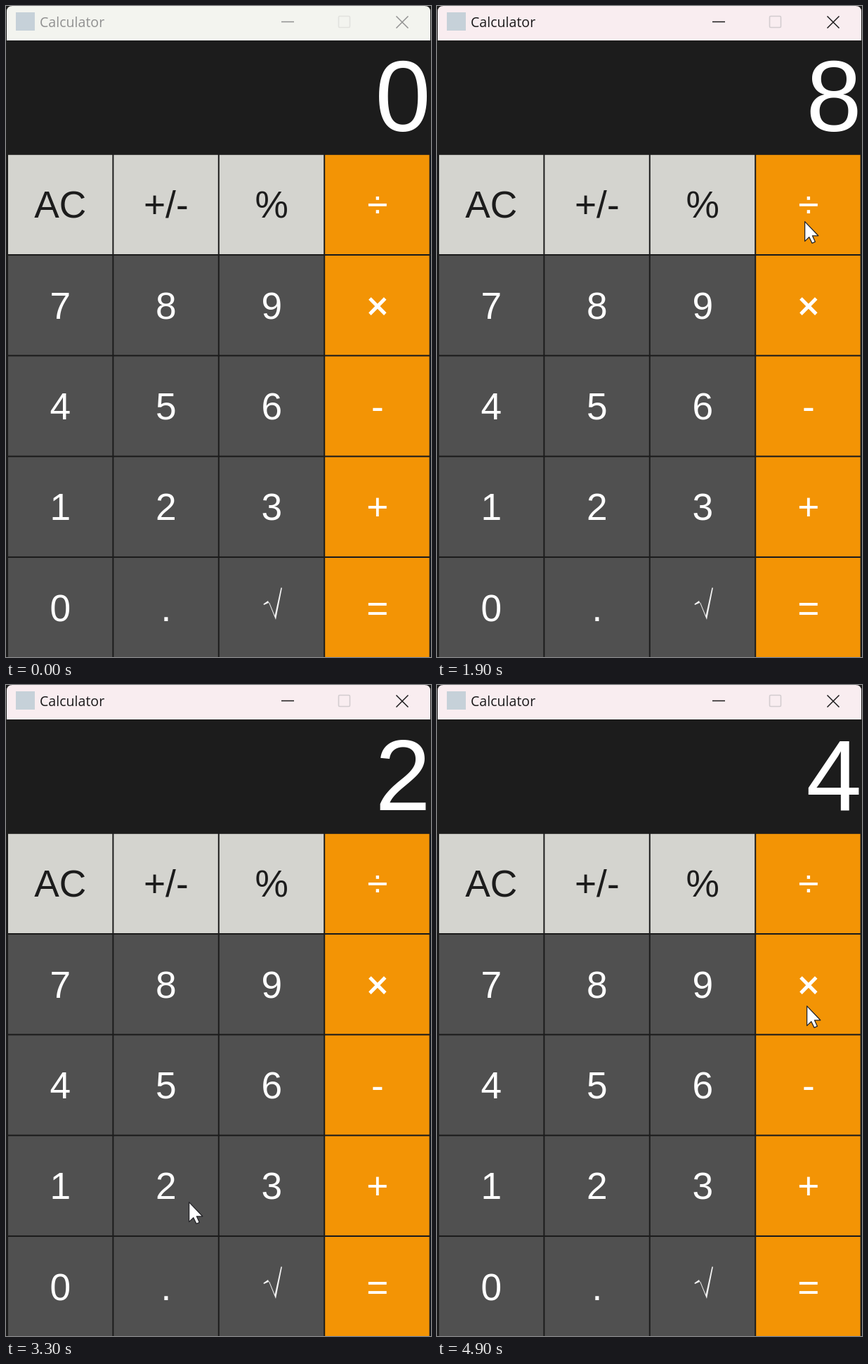
An HTML page that plays this animation: 605x926 px, repeating every 5 s.

```html
<!DOCTYPE html>
<html lang="en">
<head>
<meta charset="utf-8">
<title>Calculator</title>
<style>
  html, body { margin: 0; width: 100%; height: 100%; overflow: hidden; background: #1c1c1c; }
  svg { display: block; width: 605px; height: 926px; }
  text { font-family: "Liberation Sans", Arial, sans-serif; }
  .title { font: 19.6px "Open Sans", "Noto Sans", sans-serif; }
  .key { font-size: 53.3px; text-anchor: middle; fill: #fff; }
  .key.dark { fill: #1c1c1c; }
  .key.heavy { stroke: #fff; stroke-width: 1.2; }
  .value text { font-size: 142.2px; text-anchor: end; fill: #fff; }

  .run, .value text, .press, .caption, .maximise, .bar stop, .cursor {
    animation: 5s step-end infinite;
  }
  .caption { color: #919191; animation-name: focus; }
  .maximise { stroke: #e2e2de; animation-name: focus-max; }
  .bar stop { stop-color: #f3f4ef; animation-timing-function: steps(3); }
  .bar .left { animation-name: tint-left; }
  .bar .right { animation-name: tint-right; }
  .press { fill: #b9cee1; visibility: hidden; }

  @keyframes focus { 12%, 100% { color: #1b1a1b; } }
  @keyframes focus-max { 12%, 100% { stroke: #d3cccf; } }
  @keyframes tint-left { 0%, 14% { stop-color: #f3f4ef; } 20%, 100% { stop-color: #f9edf0; } }
  @keyframes tint-right { 0%, 12% { stop-color: #f3f4ef; } 16%, 100% { stop-color: #f9edf0; } }

  .zero { animation-name: show-zero !important; }
  .eight { animation-name: show-eight !important; }
  .two { animation-name: show-two !important; }
  .four { animation-name: show-four !important; }
  @keyframes show-zero {
    0%, 42% { visibility: visible; } 32%, 62%, 100% { visibility: hidden; }
  }
  @keyframes show-eight { 0%, 42%, 100% { visibility: hidden; } 32% { visibility: visible; } }
  @keyframes show-two { 0%, 80%, 100% { visibility: hidden; } 62% { visibility: visible; } }
  @keyframes show-four { 0%, 100% { visibility: hidden; } 80% { visibility: visible; } }

  @keyframes press-8 { 30% { visibility: visible; } 32% { visibility: hidden; } }
  @keyframes press-div { 40% { visibility: visible; } 42% { visibility: hidden; } }
  @keyframes press-2 { 60% { visibility: visible; } 62% { visibility: hidden; } }
  @keyframes press-eq { 78% { visibility: visible; } 80% { visibility: hidden; } }

  .cursor { animation-name: move; }
  @keyframes move {
    0%, 24% { transform: translate(300px, 960px); }
    26% { transform: translate(285px, 860px); }
    28% { transform: translate(255px, 660px); }
    30% { transform: translate(236px, 452px); }
    34% { transform: translate(300px, 430px); }
    36% { transform: translate(440px, 350px); }
    38% { transform: translate(523px, 306px); }
    44% { transform: translate(450px, 400px); }
    46% { transform: translate(300px, 590px); }
    48% { transform: translate(165px, 715px); }
    50% { transform: translate(121px, 724px); }
    54% { transform: translate(130px, 722px); }
    56% { transform: translate(165px, 708px); }
    58% { transform: translate(198px, 699px); }
    60% { transform: translate(202px, 698px); }
    66% { transform: translate(260px, 735px); }
    68% { transform: translate(370px, 800px); }
    70% { transform: translate(470px, 832px); }
    72% { transform: translate(510px, 838px); }
    74% { transform: translate(513px, 838px); }
    86% { transform: translate(514px, 836px); }
    88% { transform: translate(520px, 800px); }
    90% { transform: translate(528px, 740px); }
    92% { transform: translate(530px, 670px); }
    94% { transform: translate(528px, 590px); }
    96% { transform: translate(524px, 496px); }
    98%, 100% { transform: translate(526px, 456px); }
  }
</style>
</head>
<body>
<svg viewBox="0 0 605 926">
  <defs>
    <linearGradient id="bar" class="bar">
      <stop class="left" offset="0"/>
      <stop class="right" offset="1"/>
    </linearGradient>
  </defs>
  <rect width="605" height="926" fill="#1c1c1c"/>

  <path d="M1 49V8Q1 0 9 0H596Q604 0 604 8V49Z" fill="url(#bar)"/>
  <rect x="14" y="9" width="27" height="26" fill="#c6d1d9"/>
  <g class="caption" fill="none" stroke="currentColor" stroke-width="1.5">
    <text class="title" x="48" y="30" fill="currentColor" stroke="none">Calculator</text>
    <path d="M392 22.5H410M555.5 14.5L572.5 31.5M572.5 14.5L555.5 31.5"/>
  </g>
  <rect class="maximise" x="473.5" y="14.5" width="16" height="16" rx="1.5" fill="none" stroke-width="1.6"/>

  <g class="value">
    <text class="zero" x="604.5" y="178">0</text>
    <text class="eight" x="604.5" y="178">8</text>
    <text class="two" x="604.5" y="178">2</text>
    <text class="four" x="604.5" y="178">4</text>
  </g>

  <g id="keys"></g>

  <path class="cursor" d="M0.6 0.6V28.6L6.8 22.8L11 31.4L15.4 29.4L11.4 20.8H19.8Z"
    fill="#fff" stroke="#26262a" stroke-width="1.3" stroke-linejoin="round"/>
</svg>
<script>
  const rows = ["AC +/- % ÷", "7 8 9 ×", "4 5 6 -", "1 2 3 +", "0 . √ ="];
  const presses = { "8": "press-8", "÷": "press-div", "2": "press-2", "=": "press-eq" };
  const keys = document.getElementById("keys");

  function add(tag, attrs, text = "") {
    const el = document.createElementNS("http://www.w3.org/2000/svg", tag);
    for (const name in attrs) el.setAttribute(name, attrs[name]);
    el.textContent = text;
    keys.append(el);
    return el;
  }

  rows.forEach((row, r) => row.split(" ").forEach((label, c) => {
    const light = r === 0 && c < 3;
    const box = { x: 3 + c * 150.4, y: 211.8 + r * 143.3, width: 148.4, height: 141.2 };
    add("rect", { ...box, fill: c === 3 ? "#f39405" : light ? "#d4d4cf" : "#505050" });
    if (presses[label]) {
      add("rect", { ...box, class: "press" }).style.animationName = presses[label];
    }
    if (label === "√") {
      add("path", {
        d: "M366.5 850.5L373 846L384 873L393 827.5L391.4 827.5L382.6 867L375 848.5L367 852Z",
        fill: "#f4f4f4"
      });
      return;
    }
    const kind = light ? " dark" : label === "×" ? " heavy" : "";
    add("text", { class: "key" + kind, x: 77.3 + c * 150.5, y: 301.3 + r * 143.3 }, label);
  }));
</script>
</body>
</html>
```
